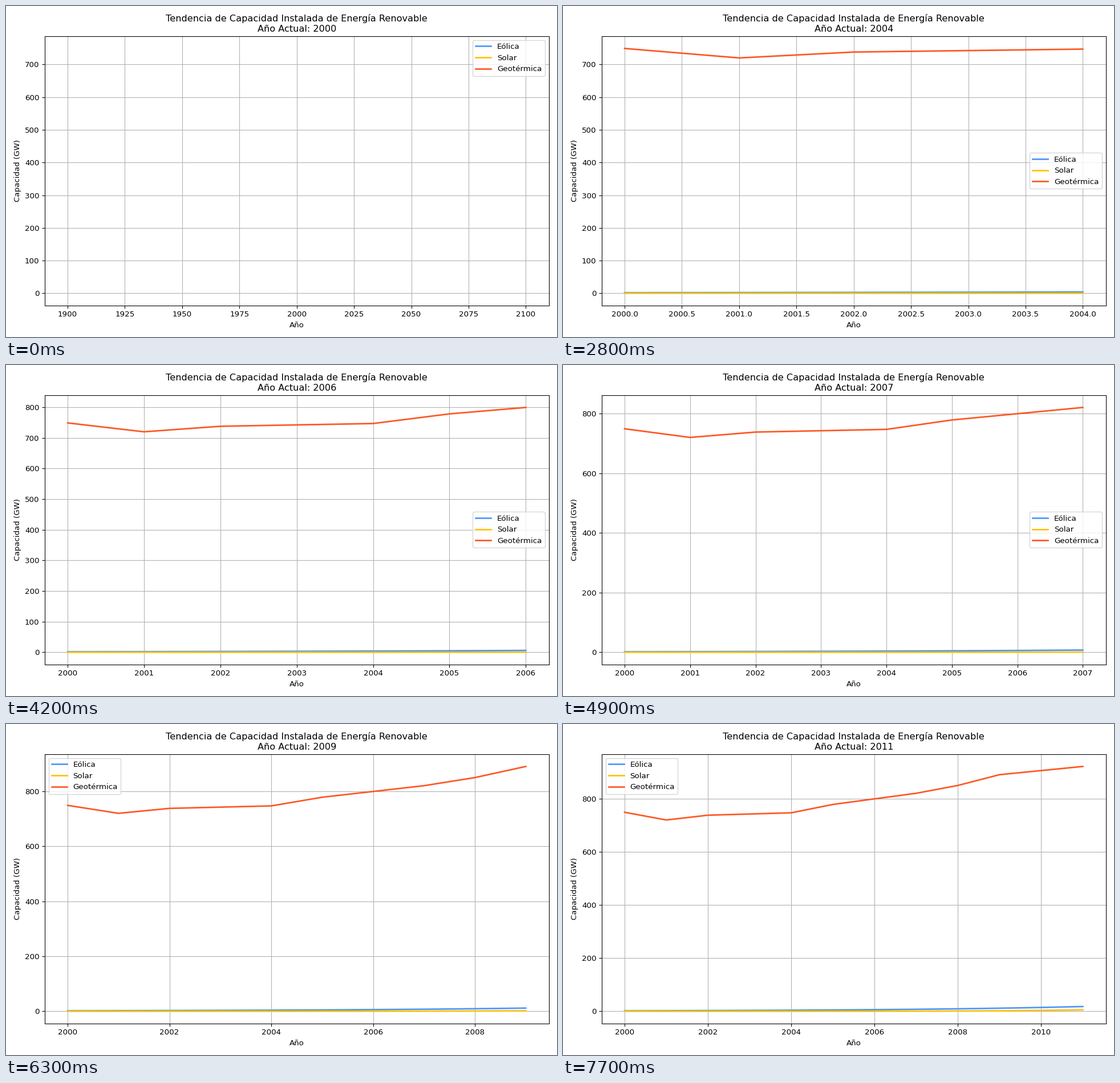
These frames come from a looping animation (966 px wide and 580 px high, 8 s). A matplotlib script:

```python
import matplotlib.pyplot as plt
import numpy as np
from matplotlib.animation import FuncAnimation

FRAME_MS = 100
FRAMES = 80
FRAMES_PER_YEAR = 7
START = 2000
SPAN = 11


def wind(n):
    return 1.6 * 1.245 ** n


def solar(n):
    return 0.1 + 5.4 * (n / SPAN) ** 6


def geothermal(n):
    # straight runs between the turning points
    return np.interp(n, [0, 1, 2, 4, 5, 7, 8, 9, 11],
                     [749, 720, 738, 747, 778.5, 820.5, 850, 890.5, 921.5])


SERIES = [
    ("Eólica", "#4D96FF", wind),
    ("Solar", "#FFC107", solar),
    ("Geotérmica", "#FF5722", geothermal),
]

fig, ax = plt.subplots(figsize=(10, 6.0042), dpi=96.6)  # 966 x 580 px


def update(frame):
    n = np.arange(frame // FRAMES_PER_YEAR + 1)
    ax.clear()
    for name, color, capacity in SERIES:
        ax.plot(START + n, capacity(n), color=color, lw=2, label=name)
    ax.set_title("Tendencia de Capacidad Instalada de Energía Renovable\n"
                 f"Año Actual: {START + n[-1]}")
    ax.set_xlabel("Año")
    ax.set_ylabel("Capacidad (GW)")
    ax.legend()
    ax.grid(True)
    return ax.get_children()


update(0)
fig.tight_layout()

anim = FuncAnimation(fig, update, frames=FRAMES, interval=FRAME_MS,
                     repeat=True, repeat_delay=0, blit=False)
plt.show()
```
